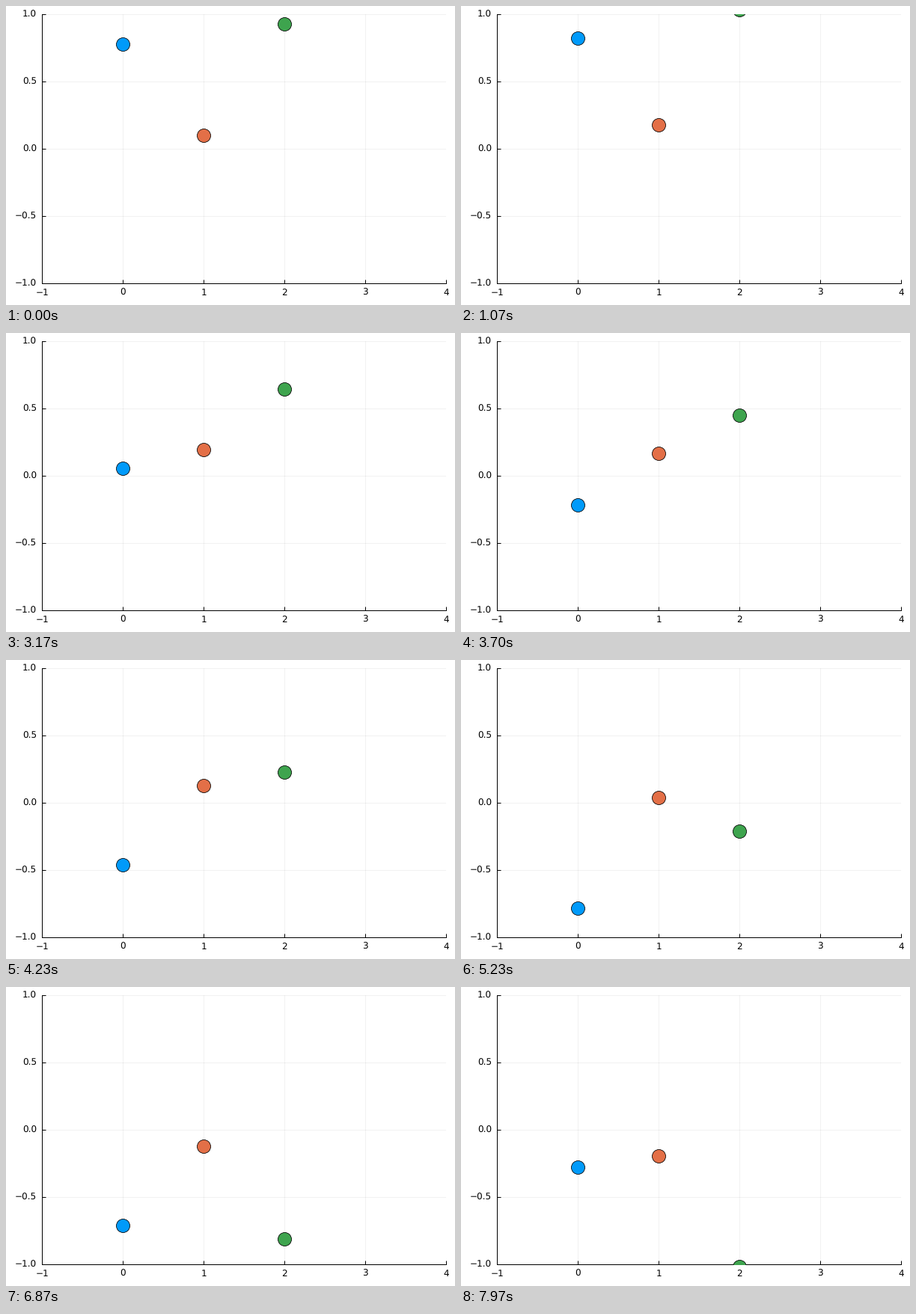
These frames come from a looping animation (600 by 400 pixels, 8 s). A matplotlib script:

```python
import numpy as np
import matplotlib.pyplot as plt
from matplotlib.animation import FuncAnimation

W, H, DPI = 600, 400, 100
FRAMES, LOOP_MS = 400, 8000
FPS = 30  # the balls move in steps at this rate
LEFT, RIGHT, TOP, BOTTOM = 48.4, 588.2, 11.45, 371.45
PX = 72 / DPI  # points per pixel

plt.rcParams["font.family"] = "DejaVu Sans"
plt.rcParams["text.hinting"] = "none"

# colour, amplitude, angular speed, time of the downward zero crossing
BALLS = [
    ("#009afa", 0.848, 0.600, 3.28),
    ("#e36f47", 0.2135, 0.472, 5.62),
    ("#3ea44e", 1.035, 0.425, 4.76),
]

fig = plt.figure(figsize=(W / DPI, H / DPI), dpi=DPI, facecolor="white")
ax = fig.add_axes([LEFT / W, 1 - BOTTOM / H,
                   (RIGHT - LEFT) / W, (BOTTOM - TOP) / H])
ax.set_xlim(-1, 4)
ax.set_ylim(-1, 1)
ax.set_xticks(range(-1, 5))
ax.set_yticks(np.linspace(-1, 1, 5))
ax.set_axisbelow(True)
ax.grid(color="black", alpha=0.1, linewidth=0.55 * PX)
ax.tick_params(direction="in", length=5 * PX, width=PX,
               labelbottom=False, labelleft=False)
for side in ("top", "right"):
    ax.spines[side].set_visible(False)
for side in ("left", "bottom"):
    ax.spines[side].set_linewidth(PX)
    ax.spines[side].set_zorder(1.5)


def label(x, y, text, ha):
    """Write a tick label with its baseline at pixel (x, y) from the top left."""
    fig.text(x / W, 1 - y / H, text.replace("-", "\u2212"), ha=ha,
             va="baseline", fontsize=12 * PX, color="black")


for v in range(-1, 5):
    label(LEFT + (v + 1) / 5 * (RIGHT - LEFT), 387, str(v), "center")
for v in np.linspace(-1, 1, 5):
    label(41, TOP + (1 - v) / 2 * (BOTTOM - TOP) + 3.8, f"{v:.1f}", "right")

dots = [
    ax.plot([x], [0], "o", color=ball[0], markersize=18 * PX,
            markeredgecolor="black", markeredgewidth=0.8 * PX, zorder=3,
            snap=False)[0]
    for x, ball in enumerate(BALLS)
]


def update(frame):
    step = round(frame / FRAMES * LOOP_MS / 1000 * FPS)
    t = step / FPS
    for dot, (_, amp, speed, zero) in zip(dots, BALLS):
        dot.set_ydata([amp * np.sin(speed * (zero - t))])
    return dots


anim = FuncAnimation(fig, update, frames=FRAMES, interval=LOOP_MS / FRAMES,
                     repeat=True, repeat_delay=0)
plt.show()
```
